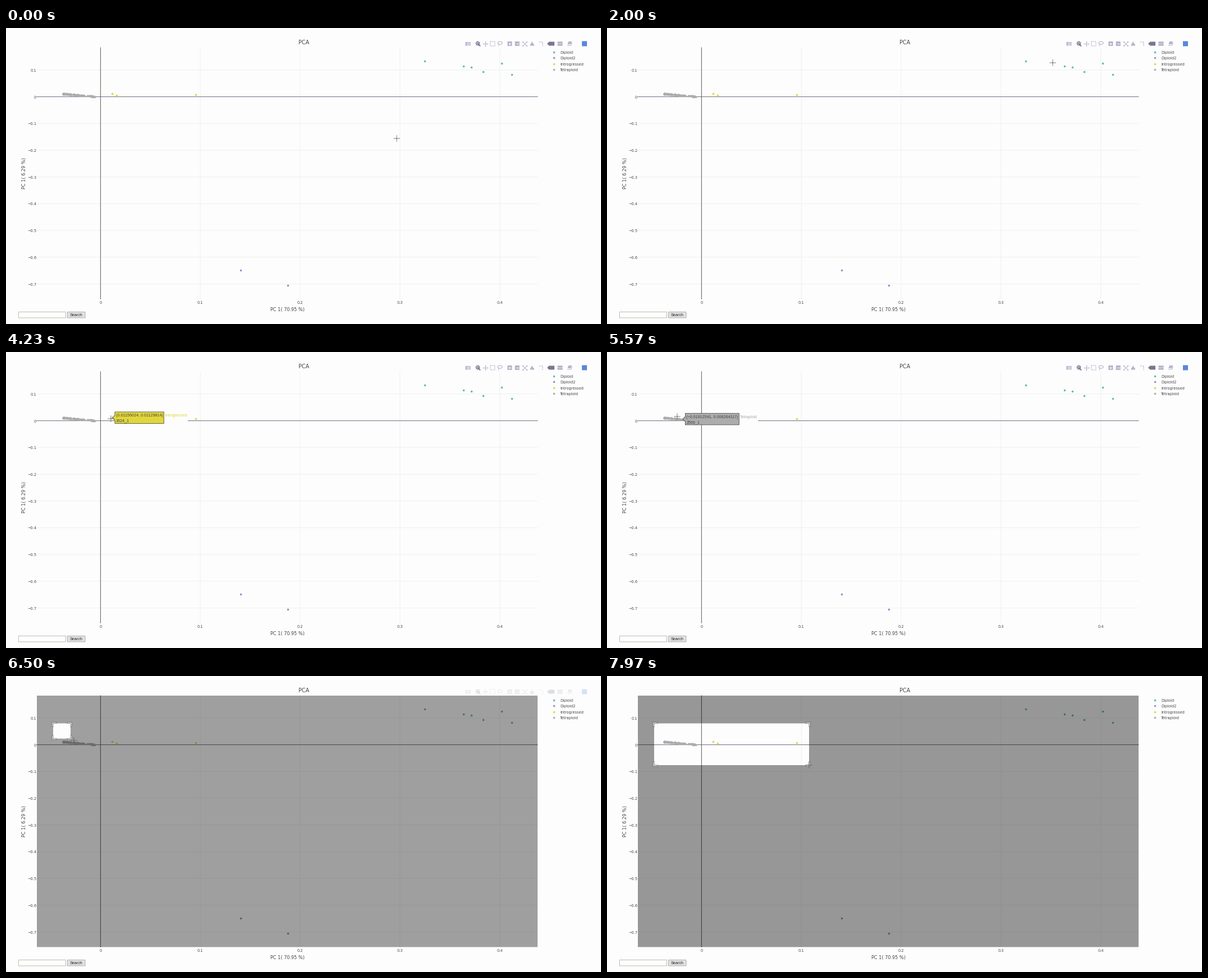
A matplotlib script for the animation above (8000 ms loop, 1060 px wide and 528 px high).

```python
import numpy as np
import matplotlib.pyplot as plt
from matplotlib.animation import FuncAnimation
from matplotlib.patches import Ellipse, PathPatch, Polygon, Rectangle
from matplotlib.path import Path

W, H, DPI = 1060, 528, 100
STEP, FRAMES = 32, 250
PX = 72 / DPI
BG, INK, GRID = "#fdfdfd", "#444444", "#f0f0f2"
LEFT, RIGHT, TOP, BOTTOM = 55, 947, 35, 483.5
LAG, PRESS = 64, 6350
rng = np.random.default_rng(4)

plt.rcParams["font.family"] = "DejaVu Sans"
plt.rcParams["path.snap"] = False
fig = plt.figure(figsize=(W / DPI, H / DPI), dpi=DPI, facecolor=BG)
ax = fig.add_axes([0, 0, 1, 1])
ax.set_xlim(0, W)
ax.set_ylim(H, 0)
ax.axis("off")


def to_px(x, y):
    return 168.4 + 1778 * x, 122.6 - 477 * y


def line(xs, ys, color, lw=1.0, z=2, **kw):
    return ax.plot(xs, ys, color=color, lw=lw * PX, zorder=z, **kw)[0]


def text(x, y, s, size, color=INK, ha="center", z=5, va="center_baseline", **kw):
    return ax.text(x, y, s, fontsize=size * PX, color=color, ha=ha, va=va,
                   zorder=z, **kw)


def box(x, y, w, h, fc, ec="none", lw=1.0, z=4, **kw):
    return ax.add_patch(Rectangle((x, y), w, h, fc=fc, ec=ec, lw=lw * PX,
                                  zorder=z, **kw))


def poly(pts, fc, z=4, **kw):
    return ax.add_patch(Polygon(pts, fc=fc, zorder=z, **kw))


def dots(xs, ys, color):
    ax.scatter(xs, ys, s=(3.6 * PX) ** 2, c=color, linewidths=0, zorder=3)


# ---- axes, grid and labels
def tick(v):
    return f"{v:.1f}".replace("-", "\u2212") if v else "0"


for k in range(5):
    gx = to_px(k / 10, 0)[0]
    line([gx, gx], [TOP, BOTTOM], GRID, z=1)
    text(gx, 489.3, tick(k / 10), 6.65)
for k in range(-7, 2):
    gy = to_px(0, k / 10)[1]
    line([LEFT, RIGHT], [gy, gy], GRID, z=1)
    text(54.3, gy + 0.6, tick(k / 10), 6.65, ha="right")
zx, zy = to_px(0, 0)
line([LEFT, RIGHT], [zy, zy], "#707088")
line([zx, zx], [TOP, BOTTOM], "#5e5e54")
text(530.5, 25, "PCA", 9.6)
text(501.5, 502, "PC 1( 70.95 %)", 8.1)
text(32, 259, "PC 1( 6.29 %)", 8.1, rotation=90, va="center")

# ---- search row
box(22.5, 506.5, 84, 10.5, "#ffffff", "#b4b4a6", 0.9)
box(109.5, 506.5, 31.5, 10.5, "#e2e2e2", "#a8a8a8", 0.9)
text(125.3, 512, "Search", 7.3, "#222222", family="Liberation Sans")

# ---- data: the last group is a dense streak thinning out to the right
d = 0.033 * rng.random(110) ** 2.2
streak = zip(d - 0.0375, 0.0107 - 0.3 * d + rng.normal(0, 0.0008, d.size))
GROUPS = [
    ("Diploid", "#62bda9", [(0.3249, 0.1335), (0.3636, 0.1136), (0.3713, 0.1105),
                            (0.3832, 0.0935), (0.4019, 0.1240), (0.4118, 0.0830)]),
    ("Diploid2", "#968ec8", [(0.1404, -0.6495), (0.1874, -0.7055)]),
    ("Introgressed", "#e0d63c", [(0.01156024, 0.01129814), (0.0159, 0.0055),
                                 (0.0952, 0.0065)]),
    ("Tetraploid", "#acacac", [(-0.01912541, 0.006264117), *streak]),
]
IDS = {0.01156024: "3624_1", -0.01912541: "2566_1"}

points = []
for i, (name, color, data) in enumerate(GROUPS):
    dots(*to_px(*np.array(data).T), color)
    row = 43 + 10.45 * i
    dots([976], [row], color)
    text(987, row + 0.4, name, 6.65, ha="left")
    for x, y in data:
        tag = IDS.get(x, f"{rng.integers(1000, 4000)}_1")
        points.append((x, y, name, color, tag))
spots = np.array([to_px(*p[:2]) for p in points])


# ---- toolbar
def mark(x, y, marker, size, color, lw=1.0, z=4, **kw):
    ax.plot([x], [y], marker=marker, ms=size * PX, color=color, mew=lw * PX,
            zorder=z, **kw)


def tag_icon(x, y, w, h, color):
    poly([(x - w, y), (x - w + h, y - h), (x + w, y - h), (x + w, y + h),
          (x - w + h, y + h)], color)


def toolbar(y=28, c="#b4b4cc", dark="#77778f"):
    starts, counts = (823, 840.3, 897.4, 954, 1004.3), (1, 4, 4, 3, 1)
    (cam, zoom, pan, sel, lasso, plus, minus, auto, home, spike, near, both,
     sheet) = [s + 13.3 * k for s, n in zip(starts, counts) for k in range(n)]
    corners = [(i, j) for i in (-1, 1) for j in (-1, 1)]
    box(cam - 4.5, y - 3, 9, 6.5, c)
    mark(cam, y, "o", 4, c, mec=BG)
    mark(zoom - 0.7, y - 1, "o", 6, dark, 1.5, mfc="none")
    mark(zoom - 0.7, y - 1, "+", 3.5, dark)
    line([zoom + 1.5, zoom + 4], [y + 1.3, y + 3.8], dark, 2)
    mark(pan, y, "+", 8, c)
    for m, dx, dy in zip("<>^v", (-4, 4, 0, 0), (0, 0, -4, 4)):
        mark(pan + dx, y + dy, m, 2.5, c, 0)
    box(sel - 4, y - 4, 8, 8, "none", c, 1.2, linestyle=(0, (1.5, 1)))
    ax.add_patch(Ellipse((lasso, y - 1.3), 8, 5, fc="none", ec=c, lw=0.8, zorder=4))
    line([lasso - 3, lasso - 2, lasso - 3], [y + 0.5, y + 2, y + 4], c)
    for x, m in ((plus, "+"), (minus, "_")):
        box(x - 4, y - 4, 8, 8, c)
        mark(x, y, m, 4.6, BG, 1.3, 5)
    mark(auto, y, "x", 6, c)
    for i, j in corners:
        mark(auto + 3.5 * i, y + 3.5 * j, "s", 2, c, 0)
    mark(home, y - 1.5, "^", 7, c, 0)
    for i in (-1, 1):
        box(home + 2 * i - 1.1, y, 2.2, 4, c)
    line([spike - 4, spike + 2, spike + 2], [y - 3, y - 3, y + 4], c, 1.2,
         linestyle=(0, (2, 1)))
    tag_icon(near + 3.2, y, 6.5, 3.5, dark)
    for j in (-2, 2):
        tag_icon(both + 6, y + j, 5, 1.7, c)
    poly([(sheet - 2, y - 4), (sheet + 4, y - 4), (sheet + 2, y + 1),
          (sheet - 4, y + 1)], c)
    line([sheet - 4, sheet + 2, sheet + 4], [y + 3, y + 3, y - 1], c)
    box(1026, y - 4.5, 9, 9, "#5b86dc")


toolbar()
cover = box(812, 18, 232, 16.5, BG, z=9)

# ---- moving parts
shade = ax.add_patch(PathPatch(Path([(0, 0)]), fc="black", ec="none", zorder=6))
brackets = ax.add_patch(PathPatch(Path([(0, 0)]), fc="white", ec=INK,
                                  lw=0.7 * PX, zorder=7))
name_bg = box(0, 0, 1, 1, BG, z=8)
label = poly([(0, 0), (1, 0), (1, 1)], BG, 8.1, ec=INK, lw=0.8 * PX)
lines = [text(0, 0, "", 7.15, ha="left", z=8.2, family="Liberation Sans")
         for _ in range(3)]
cross = line([], [], "#606060", 0.8, 10)

# stops of the pointer: time, x, y
STOPS = np.array([
    (0, 696, 197), (1300, 826, 74), (2000, 794, 62), (2900, 897, 85),
    (4000, 200, 121), (4200, 187, 119), (4800, 158, 122), (5504, 134.4, 119.6),
    (5568, 125, 115), (6100, 84, 84), (PRESS, 84, 84), (6400, 98, 102),
    (6496, 121, 115), (7930, 360, 159)])


def ease(u):
    return u * u * (3 - 2 * u)


def pointer(t):
    times = STOPS[:, 0]
    k = np.clip(np.searchsorted(times, t, "right") - 1, 0, len(times) - 2)
    a, b = STOPS[k], STOPS[k + 1]
    u = np.clip((t - a[0]) / (b[0] - a[0]), 0, 1)
    return a[1:] + (b - a)[1:] * ease(u)


def rings(shapes):
    return Path.make_compound_path(*[Path(s + s[:1], closed=True) for s in shapes])


def show_hover(t):
    dist = np.hypot(*(spots - pointer(t - LAG)).T)
    i = int(dist.argmin())
    on = t < PRESS and dist[i] < 12
    for art in (name_bg, label, *lines):
        art.set_visible(on)
    if not on:
        return
    vx, vy, name, color, tag = points[i]
    x, y = spots[i]
    coords = f"({vx:.7g}, {vy:.7g})".replace("-", "\u2212")
    for art, s in zip(lines, (coords, tag, name)):
        art.set_text(s)
    left = x + 5
    right = left + lines[0].get_window_extent().width + 3.5
    lines[0].set_position((left + 2, y - 4.3))
    lines[1].set_position((left + 2, y + 4.9))
    lines[2].set_position((right + 2, y - 4.3))
    lines[2].set_color(color)
    top, low = y - 10.3, y + 10.3
    label.set_xy([(x + 0.5, y), (left, y - 4.4), (left, top), (right, top),
                  (right, low), (left, low), (left, y + 4.4)])
    label.set_facecolor(color)
    name_bg.set_bounds(right, top, lines[2].get_window_extent().width + 3, low - top)


def show_zoom(t):
    on = t > PRESS
    shade.set_visible(on)
    brackets.set_visible(on)
    if not on:
        return
    s = min((t - PRESS) / 200, 1)
    s = 4 * s ** 3 if s < 0.5 else 1 - 4 * (1 - s) ** 3
    x0, y0 = 84, 84.5
    x1, y1 = np.maximum(pointer(t - STEP), (x0 + 1, y0 + 1))
    shade.set_path(rings([
        [(LEFT, TOP), (RIGHT, TOP), (RIGHT, BOTTOM), (LEFT, BOTTOM)],
        [(x0, y0), (x0, y1), (x1, y1), (x1, y0)]]))
    shade.set_alpha(0.4 * s)
    arm = min(6, (x1 - x0) / 2, (y1 - y0) / 2)
    angle = [(-2, arm), (0, arm), (0, 0), (arm, 0), (arm, -2), (-2, -2)]
    brackets.set_path(rings([
        [(cx + sx * px, cy + sy * py) for px, py in angle]
        for cx, sx in ((x0, 1), (x1, -1)) for cy, sy in ((y0, 1), (y1, -1))]))
    brackets.set_alpha(s ** 2)


def update(n):
    t = n * STEP
    show_hover(t)
    show_zoom(t)
    cover.set_alpha(float(np.clip((t - 6400) / 125, 0, 1)))
    x, y = pointer(t)
    cross.set_data([x - 5.5, x + 5.5, np.nan, x, x], [y, y, np.nan, y - 5.5, y + 5.5])
    return []


anim = FuncAnimation(fig, update, frames=FRAMES, interval=STEP,
                     init_func=lambda: update(0), repeat=True, repeat_delay=0)
plt.show()
```
